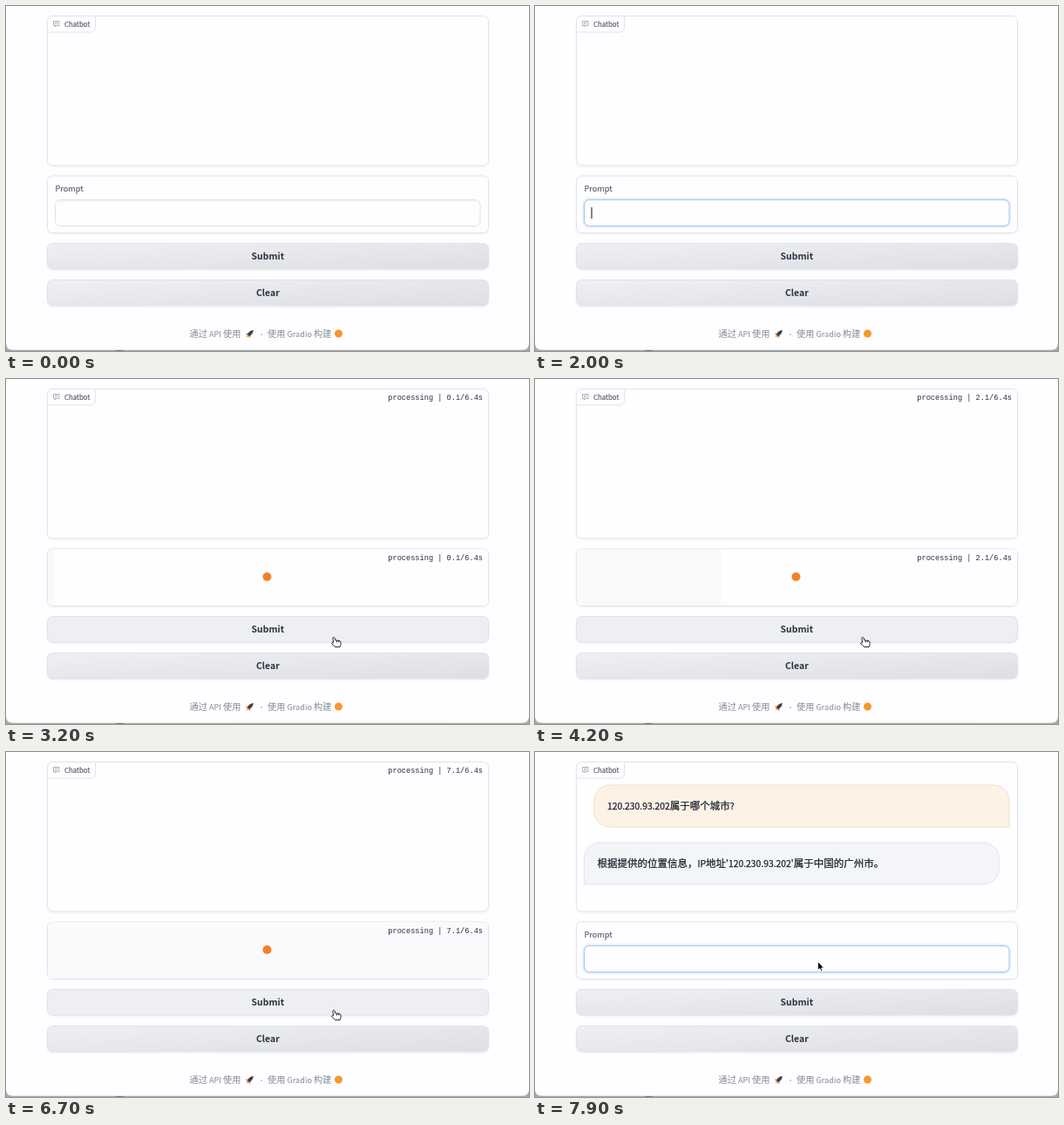
An HTML page for the animation above (8000 ms loop, 600 by 396 pixels).

```html
<!DOCTYPE html>
<html lang="zh">
<head>
<meta charset="utf-8">
<style>
html, body { margin: 0; height: 100%; overflow: hidden; background: #a9a9ab; }
svg { display: block; width: 600px; height: 396px; }
text { font-family: "Noto Sans CJK SC", "Noto Sans CJK", sans-serif; white-space: pre; }
.mono { font: 8.65px "Liberation Mono", monospace; fill: #27303f; text-anchor: end; }
.block { fill: #fefdff; stroke: #e3e4e9; }
.btn { stroke: #e0e2e7; }
.message { fill: #1b2230; stroke: #1b2230; stroke-width: .25; }
.label { fill: #545b69; stroke: #545b69; stroke-width: .15; }
.shade { filter: drop-shadow(0 1px 1px #0000000d); }
</style>
</head>
<body>
<svg viewBox="0 0 600 396">
  <defs>
    <linearGradient id="grey" x1="0" y1="0" x2="1" y2="1">
      <stop offset="0" stop-color="#eef0f3"/><stop offset="1" stop-color="#dddfe5"/>
    </linearGradient>
    <clipPath id="promptClip"><rect x="48" y="195.5" width="505" height="64.5" rx="5.5"/></clipPath>
  </defs>

  <path d="M126 395.6H135" stroke="#666" stroke-width=".8"/>
  <path d="M0 0H600V387Q600 394.8 592 394.8H8Q0 394.8 0 387Z" fill="#fefdff"/>

  <rect class="block shade" x="47.5" y="11.5" width="506" height="171.5" rx="6"/>
  <g id="chat">
    <path d="M86 38H526a18 18 0 0 1 18 18V86H86a18 18 0 0 1-18-18V56a18 18 0 0 1 18-18Z" fill="#fdf2e6" stroke="#f5dfc2"/>
    <path d="M74.5 104H514.5a18 18 0 0 1 18 18V134a18 18 0 0 1-18 18H56.5V122a18 18 0 0 1 18-18Z" fill="#f4f5f8" stroke="#e3e6eb"/>
    <text class="message" data-size="11.5" x="83" y="66">120.230.93.202属于哪个城市?</text>
    <text class="message" data-size="11.5" x="71.5" y="132">根据提供的位置信息，IP地址'120.230.93.202'属于中国的广州市。</text>
  </g>
  <path class="block" d="M47.5 30V17.5a6 6 0 0 1 6-6H102.5V25a5 5 0 0 1-5 5Z"/>
  <path d="M54.5 17.5h6.5v5h-3l-1.5 1.5v-1.5h-2zM56 19.2h3.5M56 20.9h2.5" fill="none" stroke="#8d929c" stroke-width=".7"/>
  <text class="label" data-size="8.7" x="67" y="23.5">Chatbot</text>

  <rect class="block shade" x="47.5" y="195" width="506" height="65.5" rx="6"/>
  <text class="label" data-size="10.2" x="56.5" y="213.3">Prompt</text>
  <rect id="ring" x="55.5" y="221.5" width="489.5" height="32" rx="7" fill="none" stroke="#e2eefb" stroke-width="2.4"/>
  <rect id="input" x="56.5" y="222.5" width="487.5" height="30" rx="6" fill="#fefdff"/>
  <path id="inset" d="M60 224H541" stroke="#f3f3f5" stroke-width="1.5"/>
  <text id="typed" class="message" data-size="10.3" x="64.5" y="241.3">120.230.93.202属于哪个城市?</text>
  <path id="caret" d="M0 231V244" stroke="#222" stroke-width="1.1"/>

  <g id="status">
    <g clip-path="url(#promptClip)">
      <rect x="47" y="195" width="507" height="66" fill="#fefdff"/>
      <rect id="bar" x="47.5" y="195" height="66" fill="#faf9fb"/>
    </g>
    <circle cx="299.5" cy="227" r="5" fill="#f0822a"/>
    <text class="mono" x="547" y="23.5"></text>
    <text class="mono" x="547" y="207.5"></text>
  </g>

  <g class="shade">
    <rect class="btn" x="47.5" y="272.5" width="506" height="29.5" rx="6"/>
    <rect class="btn" x="47.5" y="314.5" width="506" height="29.5" rx="6"/>
  </g>
  <g fill="#2a3240" font-weight="600" text-anchor="middle">
    <text data-size="11.6" x="300.3" y="291">Submit</text>
    <text data-size="11.6" x="300.3" y="332.7">Clear</text>
  </g>

  <g fill="#858b97">
    <text data-size="10.2" x="210.5" y="380.3">通过 API 使用</text>
    <circle cx="293" cy="377" r=".8"/>
    <text data-size="10.2" x="300" y="380.3">使用 Gradio 构建</text>
  </g>
  <g transform="translate(280 376) rotate(45)">
    <path d="M-1.3 .5L-3.8 3.5L-1.2 3.8ZM1.3 .5L3.8 3.5L1.2 3.8ZM-1.5 2.5L0 6L1.5 2.5Z" fill="#f08a34"/>
    <path d="M0-5.5Q3.2-1.5 1.5 2.8H-1.5Q-3.2-1.5 0-5.5Z" fill="#3c4250"/>
  </g>
  <circle cx="381.5" cy="376" r="4.5" fill="#f5982e"/>

  <g id="pointer" stroke-linejoin="round">
    <path id="arrow" d="M0 0V10L2.3 8L3.9 11.5L5.5 10.8L4 7.4H7Z" fill="#000" stroke="#fff" stroke-width=".9"/>
    <path id="hand" d="M-1.8 6.5L-2.6 1.6Q-2.5 .2-1.2 .4Q-.5 .6-.2 1.8L.4 4L4.5 4.3Q6.6 4.6 6.6 6.5V8.5Q6.4 10 5.6 11.6H0Q-1.2 9.8-3.4 8.2Q-4.4 6.9-3 6.3ZM2 4.4V6.4M4.2 4.4V6.4" fill="#fff" stroke="#111" stroke-width=".9"/>
    <path id="beam" d="M-2.5-7.5Q0-7.5 0-6Q0-7.5 2.5-7.5M0-6V6M-2.5 7.5Q0 7.5 0 6Q0 7.5 2.5 7.5" fill="none" stroke="#333"/>
  </g>
</svg>

<script>
const LOOP = 8000, START = 3200, DONE = 7100, ESTIMATE = 6.4;
const $ = id => document.getElementById(id);
const buttons = document.querySelectorAll('.btn');
const counters = document.querySelectorAll('.mono');

// Each track is a list of [time, x, y]; the pointer is hidden between tracks.
const tracks = [
  [[100, 296, 364], [300, 228, 300], [500, 169, 243], [700, 169, 243], [1000, 60, 244],
   [1100, 68, 244], [1200, 68, 244], [1300, 192, 226], [1400, 192, 226]],
  [[2800, 230, 236], [2900, 310, 282], [3000, 370, 305], [3100, 377.5, 296], [7100, 377.5, 296],
   [7200, 362, 268], [7400, 331, 246], [7600, 324.5, 240.5], [LOOP, 324.5, 240.5]],
];
const caretOn = [[600, 1000], [1300, 1400], [1600, 1800], [2000, 2300], [2500, START]];

const within = (v, a, b) => v >= a && v < b;
const show = (id, on) => $(id).style.display = on ? '' : 'none';

// Latin glyphs run larger than Han glyphs in this face, so they get a smaller size.
for (const el of document.querySelectorAll('text[data-size]')) {
  const size = +el.dataset.size;
  const runs = el.textContent.match(/[\u3000-\uffff]+|[^\u3000-\uffff]+/g);
  el.replaceChildren(...runs.map(run => {
    const span = document.createElementNS(el.namespaceURI, 'tspan');
    span.setAttribute('font-size', run > '\u3000' ? size : size * .9);
    span.textContent = run;
    return span;
  }));
}

function pointerAt(t) {
  const track = tracks.find(k => within(t, k[0][0], k[k.length - 1][0]));
  if (!track) return null;
  const i = track.findIndex(k => k[0] > t);
  const [t0, x0, y0] = track[i - 1], [t1, x1, y1] = track[i];
  const f = (t - t0) / (t1 - t0);
  return [x0 + (x1 - x0) * f, y0 + (y1 - y0) * f];
}

function drawPointer(t) {
  const at = pointerAt(t);
  show('pointer', at);
  const y = at ? at[1] : -1;
  const hover = [within(y, 272, 302), within(y, 314, 344)];
  buttons.forEach((b, i) => b.setAttribute('fill', hover[i] ? '#edeff2' : 'url(#grey)'));
  if (!at) return;
  const shape = hover.includes(true) ? 'hand' : within(y, 222, 253) && t < START ? 'beam' : 'arrow';
  ['arrow', 'hand', 'beam'].forEach(s => show(s, s === shape));
  $('pointer').setAttribute('transform', `translate(${at})`);
}

function draw(t) {
  const focused = within(t, 600, START) || t >= 7600;
  show('ring', focused);
  show('inset', !focused);
  $('input').setAttribute('stroke', focused ? '#a0c8ef' : '#e1e2e7');

  const typed = within(t, 2500, START);
  show('typed', typed);
  show('caret', caretOn.some(([a, b]) => within(t, a, b)));
  $('caret').setAttribute('transform', `translate(${typed ? 197 : 65})`);

  show('status', within(t, START, DONE));
  const elapsed = Math.max(0, .1 + (t - START) / 500);
  $('bar').setAttribute('width', 506 * Math.min(1, elapsed / ESTIMATE));
  counters.forEach(c => c.textContent = `processing | ${elapsed.toFixed(1)}/${ESTIMATE}s`);

  $('chat').style.opacity = t < DONE ? 0 : Math.min(1, (t - DONE + 100) / 400);
  drawPointer(t);
}

function tick() {
  draw(Math.floor(performance.now() % LOOP / 100) * 100);
  requestAnimationFrame(tick);
}
tick();
</script>
</body>
</html>
```
